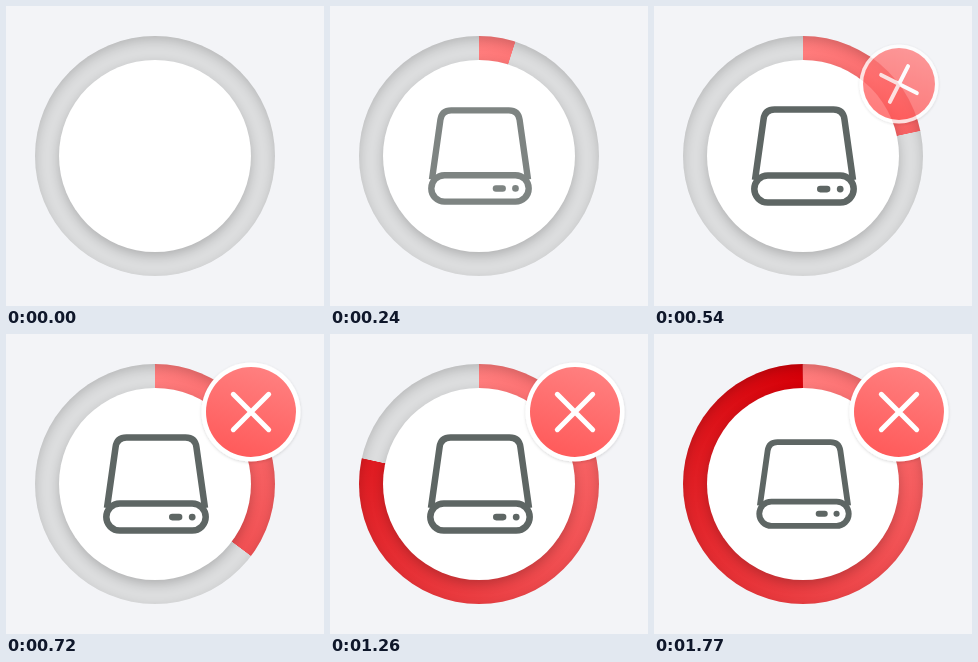
Write an HTML page that moves like this. It is 318 by 300 pixels and loops after 1800 ms.

```html
<!DOCTYPE html>
<html lang="en">
<head>
<meta charset="utf-8">
<title>Disk progress</title>
<style>
  html, body { margin: 0; width: 100%; height: 100%; overflow: hidden; background: #f3f4f7; }
  .stage { position: absolute; left: 0; top: 0; width: 318px; height: 300px; overflow: hidden; }
  .ring, .shade, .disc { position: absolute; border-radius: 50%; }
  .ring, .shade { left: 29px; top: 30px; width: 240px; height: 240px; }
  .ring { background: #dcddde; }
  .shade { box-shadow: inset 0 4px 11px rgba(0, 0, 0, .17); }
  .disc { left: 53px; top: 54px; width: 192px; height: 192px; background: #fff; box-shadow: 0 4px 11px rgba(0, 0, 0, .2); }
  svg { position: absolute; left: 0; top: 0; }
</style>
</head>
<body>
<div class="stage">
  <div class="ring" id="ring"></div>
  <div class="shade"></div>
  <div class="disc"></div>
  <svg width="318" height="300" viewBox="0 0 318 300">
    <defs>
      <linearGradient id="red" x1="0.65" y1="0" x2="0.35" y2="1">
        <stop offset="0" stop-color="#ff8080"/>
        <stop offset="1" stop-color="#ff5a5a"/>
      </linearGradient>
      <filter id="soft" x="-20%" y="-20%" width="140%" height="140%">
        <feDropShadow dx="0" dy="1" stdDeviation="1.8" flood-color="#000" flood-opacity=".15"/>
      </filter>
    </defs>
    <g id="drive" fill="none" stroke="#5e6664" stroke-width="6.5">
      <path d="M-49 24 L-40.4 -37 Q-39 -46.5 -29.5 -46.5 H29.5 Q39 -46.5 40.4 -37 L49 24"/>
      <rect x="-49.7" y="19.6" width="99.4" height="27" rx="13.5" fill="#fff"/>
      <g fill="#5e6664" stroke="none">
        <rect x="13" y="29.8" width="13.4" height="6.6" rx="3.3"/>
        <circle cx="36.2" cy="33.1" r="3.4"/>
      </g>
    </g>
    <g id="badge">
      <circle r="49.5" fill="#fff" filter="url(#soft)"/>
      <circle r="45" fill="url(#red)"/>
      <path id="cross" d="M-17.7 -17.7 L17.7 17.7 M17.7 -17.7 L-17.7 17.7" stroke="#fff" stroke-width="5" stroke-linecap="round"/>
    </g>
  </svg>
</div>
<script>
  const LOOP = 1800, STEP = 30;
  const [ring, drive, badge, cross] = ['ring', 'drive', 'badge', 'cross'].map(id => document.getElementById(id));
  const pale = [255, 124, 124], deep = [214, 0, 8];

  const span = (t, from, to) => Math.min(1, Math.max(0, (t - from) / (to - from)));
  const smooth = x => x * x * (3 - 2 * x);
  const mix = k => `rgb(${pale.map((c, i) => c + (deep[i] - c) * k)})`;

  function place(node, x, y, scale, opacity) {
    node.setAttribute('transform', `translate(${x} ${y}) scale(${scale})`);
    node.setAttribute('opacity', opacity);
  }

  function draw(t) {
    const filled = smooth(t / LOOP), angle = filled * 360;
    ring.style.background = filled
      ? `conic-gradient(${mix(0)} 0deg, ${mix(filled)} ${angle}deg, #dcddde ${angle + 0.3}deg)`
      : '#dcddde';

    const appear = span(t, 0, 300), shrink = span(t, 1620, 1770);
    place(drive, 150, 150, 0.9 + 0.1 * (appear - shrink), appear);

    const pop = span(t, 300, 600);
    place(badge, 245, 78, pop, pop);
    cross.setAttribute('transform', `rotate(${90 * (pop - 1)})`);
  }

  function tick() {
    // The picture advances in 30 ms steps.
    draw(Math.floor(performance.now() / STEP + 0.01) * STEP % LOOP);
    requestAnimationFrame(tick);
  }
  tick();
</script>
</body>
</html>
```
